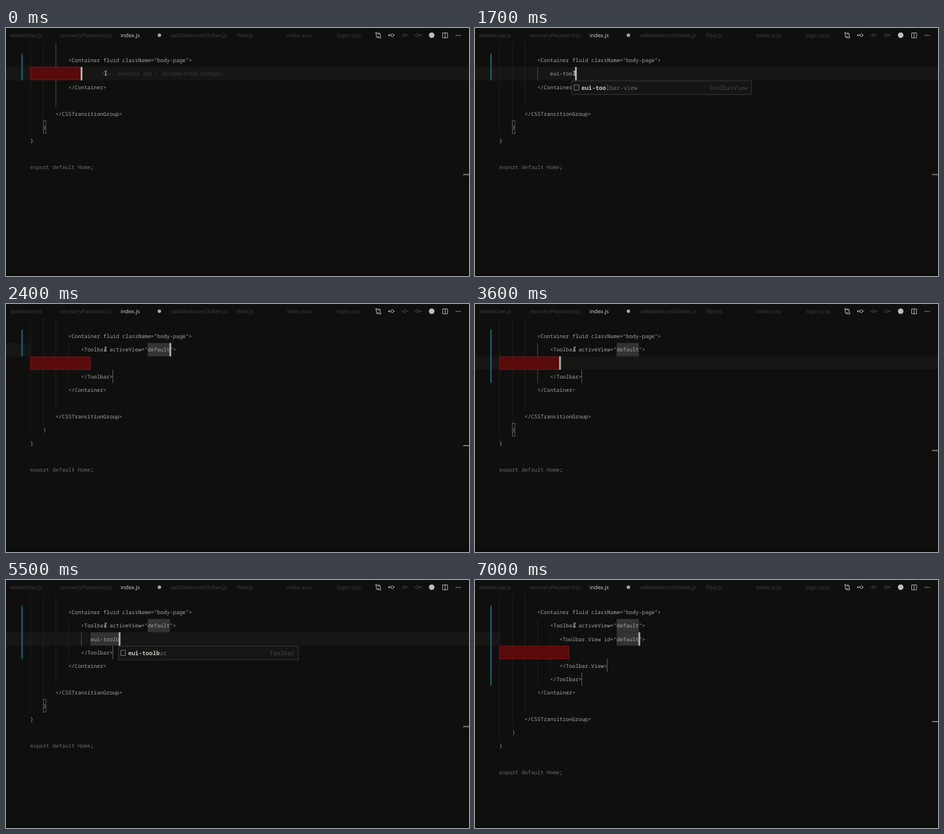
Recreate the animation shown at these times as an HTML page with a canvas. Size 800 px wide and 429 px high, loop 8000 ms.

```html
<!DOCTYPE html>
<html lang="en">
<head>
<meta charset="utf-8">
<title>Snippet completion</title>
<style>
html, body { margin: 0; width: 100%; height: 100%; overflow: hidden; background: #0f100e; }
canvas { display: block; }
</style>
</head>
<body>
<canvas id="stage" width="800" height="429"></canvas>
<script>
const ctx = document.getElementById('stage').getContext('2d');
ctx.textRendering = 'geometricPrecision';

const LOOP = 8000, CHAR = 5.48, ROW = 23.06, LEFT = 42, TOP = 44.4;
const MONO = '"Noto Sans Mono", "DejaVu Sans Mono", monospace';
const CODE = `9.13px ${MONO}`, POPUP = `10.1px ${MONO}`;
const TAB = '9.27px "Noto Sans", "Open Sans", sans-serif';
const SNIPPET = 'eui-toolbar-view';

// [start ms, expanded snippets, typed characters (-1: placeholder selected), characters matched by popup]
const STEPS = [
  [0, 0, 0, 0], [200, 0, 1, 0], [300, 0, 2, 0], [400, 0, 2, 2], [500, 0, 3, 2], [600, 0, 3, 3],
  [1000, 0, 4, 3], [1100, 0, 4, 4], [1300, 0, 5, 4], [1400, 0, 6, 5], [1500, 0, 7, 7],
  [1700, 0, 8, 7], [1800, 0, 9, 8], [1900, 0, 9, 9], [2000, 0, 10, 9], [2100, 0, 11, 10],
  [2200, 0, 11, 11], [2300, 1, -1, 0], [3600, 1, 0, 0], [4100, 1, 1, 0], [4200, 1, 2, 0],
  [4400, 1, 3, 0], [4700, 1, 4, 4], [4900, 1, 5, 4], [5000, 1, 6, 5], [5100, 1, 7, 7],
  [5300, 1, 8, 8], [5500, 1, 9, 9], [5600, 1, 10, 9], [5700, 1, 10, 10], [5800, 1, 11, 10],
  [5900, 1, 12, 11], [6000, 1, 12, 12], [6900, 2, -1, 0]
];
const TABS = [[7, 'deleteUser.js'], [94, 'recoveryPassword.js'], [198, 'index.js'],
  [284, 'validateAccessToken.js'], [399, 'filter.js'], [485, 'index.scss'], [571.5, 'login.scss']];

const colX = col => LEFT + col * CHAR;
const rowY = row => TOP + row * ROW;

function rect(x, y, w, h, color) {
  ctx.fillStyle = color;
  ctx.fillRect(x, y, w, h);
}
function frame(x, y, w, h, fill, edge) {
  rect(x, y, w, h, fill);
  ctx.strokeStyle = edge;
  ctx.lineWidth = 1;
  ctx.strokeRect(x, y, w, h);
}
function text(str, x, y, color, font = CODE, align = 'left') {
  ctx.font = font;
  ctx.fillStyle = color;
  ctx.textAlign = align;
  ctx.fillText(str, x, y);
}
function dot(x, y, r, color) {
  ctx.fillStyle = color;
  ctx.beginPath();
  ctx.arc(x, y, r, 0, 7);
  ctx.fill();
}
function stroke(path, color, width = 1) {
  ctx.strokeStyle = color;
  ctx.lineWidth = width;
  ctx.stroke(new Path2D(path));
}
const ring = (x, y, r) => `M${x + r} ${y}a${r} ${r} 0 1 0 ${-2 * r} 0a${r} ${r} 0 1 0 ${2 * r} 0`;

function drawTabs() {
  for (const [x, name] of TABS) text(name, x, 16.3, name === 'index.js' ? '#c8c8c4' : '#3e3f3c', TAB);
  dot(265, 12.5, 3, '#a6a6a2');

  const bright = '#bcbcb8', dim = '#4a4b48';
  stroke(ring(640, 9, 1.4) + ring(646.5, 16.5, 1.4) +
    'M640 10.5V16H643.5M642 14l2 2l-2 2M646.5 15V9.5H643M644.8 7.5l-2 2l2 2', bright);
  stroke(ring(667.5, 12.5, 2.4) + 'M665 12.5H660.5M662.8 10.3l-2.3 2.2l2.3 2.2M670 12.5h1.7', bright);
  stroke(ring(689, 12.5, 2.4) + 'M686.5 12.5H683.5M691.5 12.5h3', dim);
  stroke(ring(710.5, 12.5, 2.4) + 'M713 12.5H717.5M715.2 10.3l2.3 2.2l-2.3 2.2M708 12.5h-1.7', dim);
  dot(735.5, 12.5, 4.8, bright);
  stroke('M754.5 8.5h8.5v8.5h-8.5zM758.8 8.5v8.5', bright);
  for (const x of [778, 781.3, 784.6]) dot(x, 12.8, 0.9, bright);
}

function codeLines(phase, typed) {
  const open = [16, '<Toolbar activeView="default">'], close = [16, '</Toolbar>'];
  const inner = [
    [[16, typed]],
    [open, [19, typed], close],
    [open, [19, '<Toolbar.View id="default">'], [22, ''], [19, '</Toolbar.View>'], close]
  ][phase];
  return [[12, '<Container fluid className="body-page">'], ...inner, [12, '</Container>'], [0, ''],
    [8, '</CSSTransitionGroup>'], [4, ')'], [0, '}'], [0, ''], [0, 'export default Home']];
}

function drawGuides(phase, count, selecting) {
  const extra = 2 * phase;
  const active = selecting ? -1 : count > 0 ? 12 + 4 * phase : 8 + 4 * phase;
  const guides = [[0, -1, 6 + extra], [4, -1, 5 + extra], [8, -1, 4 + extra], [12, 1, 2 + extra], [16, 2, 1 + extra]];
  for (const [col, from, to] of guides) {
    if (to <= from) continue;
    const y = Math.max(25, rowY(from));
    rect(Math.round(colX(col)) - 0.3, y, 1, rowY(to) - y, col === active ? '#51524e' : '#232421');
  }
}

function drawPopup(phase, matched, row) {
  const x = Math.round(colX(16 + 3 * phase + matched)) - 0.5, y = Math.round(rowY(row + 1)) + 0.5;
  const isView = phase ? matched > 11 : matched < 11;
  const item = isView ? SNIPPET : 'eui-toolbar';
  const base = y + 15;
  frame(x, y, 310.5, 23.5, '#151614', '#3a3b38');
  ctx.strokeRect(x + 4, y + 7, 8, 9);
  stroke(`M${x + 4} ${y + 7}h8v9h-8z`, '#7b7c78');
  const head = item.slice(0, matched);
  text(head, x + 16.5, base, '#c6c6c2', 'bold ' + POPUP);
  const width = ctx.measureText(head).width;
  text(item.slice(matched), x + 16.5 + width, base, '#6c6d69', POPUP);
  text(isView ? 'ToolbarView' : 'Toolbar', x + 303.5, base, '#464743', POPUP, 'right');
}

function drawLint(row, caretX, startCol) {
  const y = rowY(row);
  rect(LEFT, y, 800 - LEFT, ROW, '#12292d');
  dot(12, y + 11.6, 5.3, '#1b9fd8');
  rect(11.4, y + 10.6, 1.3, 4, '#0f100e');
  rect(11.4, y + 8.3, 1.3, 1.3, '#0f100e');
  text('"toolb": Unknown word.', caretX + 24, y + 15, '#08a4c8');
  for (let x = colX(startCol); x < colX(startCol + 5); x += 4.5) rect(x, y + 22, 2.8, 1, '#6d807f');
}

function draw(t) {
  const [, phase, count, matched] = STEPS.findLast(step => step[0] <= t);
  const selecting = count < 0;
  const row = selecting ? phase : phase + 1;
  const startCol = 16 + 3 * phase;
  const caretX = colX(selecting ? 44 : startCol + count);
  const lint = (t >= 1900 && t < 2200) || (t >= 5700 && t < 5900);
  const lines = codeLines(phase, SNIPPET.slice(0, Math.max(0, count)));

  rect(0, 0, 800, 429, '#0f100e');
  rect(0, 425, 800, 4, '#0b0c0a');
  rect(0, rowY(row), selecting ? LEFT : 800, ROW, '#161715');
  if (lint) drawLint(row, caretX, startCol + 4);
  drawGuides(phase, count, selecting);

  for (let r = 1; r <= phase; r++) rect(colX(37), rowY(r), 7 * CHAR, ROW, '#333432');
  if (phase === 1 && count > 0) rect(colX(19), rowY(2), count * CHAR, ROW, '#333432');
  if (phase) rect(184, rowY(2 * phase + 1), 1, ROW, '#62635f');
  if (phase === 2) rect(228, rowY(4), 1, ROW, '#62635f');

  lines.forEach(([col, str], r) => {
    if (str) text(str, colX(col), rowY(r) + 15, str.startsWith('export') ? '#6b6c68' : '#a3a39f');
    else if (col) frame(LEFT + 0.5, Math.round(rowY(r)) + 0.5, colX(col) - LEFT - 0.5, 22, '#590b0b', '#7a1616');
  });
  const last = lines.length - 1;
  text(';', colX(19), rowY(last) + 15, '#b4b4b0');
  if (!selecting) {
    ctx.strokeStyle = '#62635f';
    ctx.lineWidth = 1;
    ctx.strokeRect(64.5, Math.round(rowY(last - 3)) + 0.5, 4.5, 22);
  }
  if (t < 200) text('You, seconds ago • Uncommitted changes', 165, rowY(1) + 15, '#3c3d3a');

  rect(26.7, TOP, 2, (t < 2600 ? 2 : t < 7000 ? 4 : 6) * ROW, '#16708d');
  rect(790, selecting ? 244 : 252.5, 10, 2, '#7f807c');
  rect(caretX - 0.7, rowY(row), 3, ROW, '#b5b5b0');
  if (matched) drawPopup(phase, matched, row);
  stroke('M170.3 74.5h1.2l.7 .6l.7-.6h1.2M172.2 75v6M170.3 81.5h1.2l.7-.6l.7 .6h1.2', '#d6d6d2');
  drawTabs();
}

function tick() {
  draw(performance.now() % LOOP);
  requestAnimationFrame(tick);
}
tick();
</script>
</body>
</html>
```
